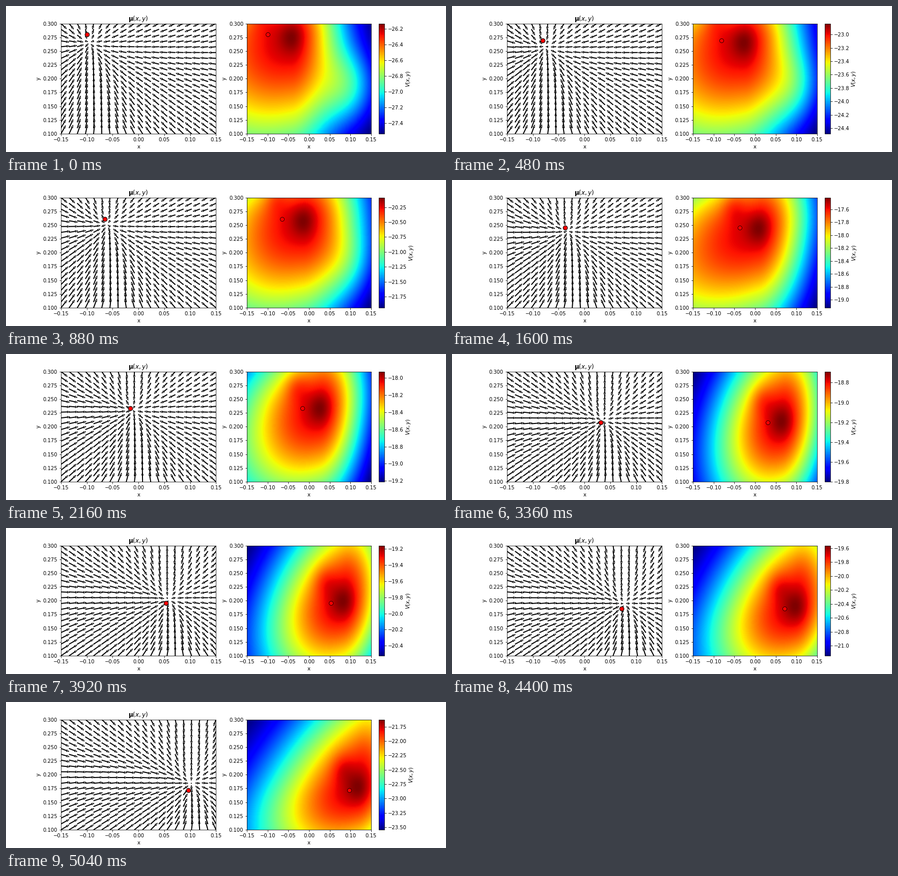
Animation of 864x288 px, one loop 5.12 s. Source, as a matplotlib script:

```python
import numpy as np
import matplotlib.pyplot as plt
from matplotlib.animation import FuncAnimation

FRAMES, INTERVAL = 64, 80
X0, X1, Y0, Y1 = -0.15, 0.15, 0.10, 0.30
RES, ARROWS = 90, 20

plt.rcParams.update({"font.family": "DejaVu Sans", "font.size": 10})

MX, MY = np.meshgrid(np.linspace(X0, X1, RES), np.linspace(Y0, Y1, RES))
QX, QY = np.meshgrid(np.linspace(X0, X1, ARROWS), np.linspace(Y0, Y1, ARROWS))


def goal(t):
    return -0.1 + 0.2 * t, 0.28 - 0.11 * t


def bump(x, y, height, sigma):
    return height * np.exp(-((MX - x)**2 + (MY - y)**2) / (2 * sigma**2))


def color_limits(i):
    """Range of the value scale, drifting between a few key points."""
    times = [0, 11, 20, 33, 42, 55, 63]
    low = [-27.535, -21.937, -19.126, -19.283, -19.800, -21.146, -23.544]
    high = [-26.133, -20.089, -17.416, -18.360, -18.688, -19.560, -21.627]
    return np.interp(i, times, low), np.interp(i, times, high)


def value_map(i):
    """Tilted hill with a different width on each side, following the goal."""
    t = i / FRAMES
    gx, gy = goal(t)
    px, py = -0.043 + 0.165 * t, 0.275 - 0.1 * t
    dx, dy = MX - px, MY - py

    times = [0, 11, 20, 33, 63]
    left = np.interp(i, times, [0.22, 0.21, 0.25, 0.108, 0.175])
    right = np.interp(i, times, [0.09, 0.11, 0.10, 0.077, 0.09])
    up, down = 0.10 + 0.05 * t, 0.165 - 0.055 * t
    sx, sy = np.where(dx < 0, left, right), np.where(dy > 0, up, down)
    tilt = 8 + 14 * t
    hill = np.exp(-(dx / sx)**2 / 2 - (dy / sy)**2 / 2 + tilt * dx * dy)

    hill += bump(px, py, 0.06, 0.02)
    hill += bump(gx - 0.015, gy + 0.04, 0.06, 0.02)
    hill += bump(0.1, 0.185, 0.3 * max(0, 1 - i / 20), 0.05)
    hill = (hill - hill.min()) / np.ptp(hill)
    low, high = color_limits(i)
    return low + (high - low) * hill


def arrows(i):
    """Arrow vectors in pixels, bent slightly off the straight line."""
    gx, gy = goal(i / FRAMES)
    cy = 0.2235 + 0.766 * (gy - 0.2235)
    cy = cy - 2 * (cy - 0.225) * np.abs(QX - gx)
    cx = gx + 0.004 + 0.13 * np.maximum(0, cy - QY)
    dx, dy = cx - QX, cy - QY
    dist = np.hypot(dx, dy)
    u, v = np.tanh(6 * dx), np.tanh(6 * dy)
    v = np.where(v < 0, 1.35 * v, v)
    norm = np.hypot(u, v) + 1e-9
    u, v = u / norm, v / norm
    size = (16 + 1.5 * u + 2.1 * v) * (1 - np.exp(-dist / 0.02))
    return u * size, v * size


fig = plt.figure(figsize=(12, 4), dpi=72)
width = (0.9 - 0.125) / 2.2
left2 = 0.125 + 1.2 * width
bottom, height = 0.125, 0.755
ax_flow = fig.add_axes([0.125, bottom, width, height])
ax_value = fig.add_axes([left2, bottom, 0.8 * width, height])
ax_bar = fig.add_axes([left2 + 0.85 * width, bottom, height / 60, height])

flow = ax_flow.quiver(QX, QY, *arrows(0), angles="uv", scale_units="dots", scale=1,
                      width=0.0033, headwidth=3.4, facecolor="white",
                      edgecolor="black", linewidth=1)
low, high = color_limits(0)
image = ax_value.imshow(value_map(0), cmap="jet", vmin=low, vmax=high,
                        aspect="auto", origin="lower", extent=(X0, X1, Y0, Y1),
                        interpolation="bilinear")
fig.colorbar(image, cax=ax_bar).set_label("$V(x,y)$", labelpad=2)

dots = []
for ax, size, edge in ((ax_flow, 8.5, 1.1), (ax_value, 8, 0.8)):
    dots += ax.plot([], [], "o", color="red", mec="black", ms=size, mew=edge, zorder=4)
    ax.set(xlim=(X0, X1), ylim=(Y0, Y1), xlabel="x", ylabel="y",
           xticks=np.linspace(X0, X1, 7), yticks=np.linspace(Y0, Y1, 9))
ax_flow.set_title(r"$\mathbf{\mu}(x,y)$", fontsize=12)


def update(i):
    gx, gy = goal(i / FRAMES)
    for dot in dots:
        dot.set_data([gx], [gy])
    flow.set_UVC(*arrows(i))
    image.set_data(value_map(i))
    image.set_clim(*color_limits(i))
    return [flow, image, *dots]


anim = FuncAnimation(fig, update, frames=FRAMES, interval=INTERVAL,
                     init_func=lambda: update(0), repeat=True, repeat_delay=0)
plt.show()
```
